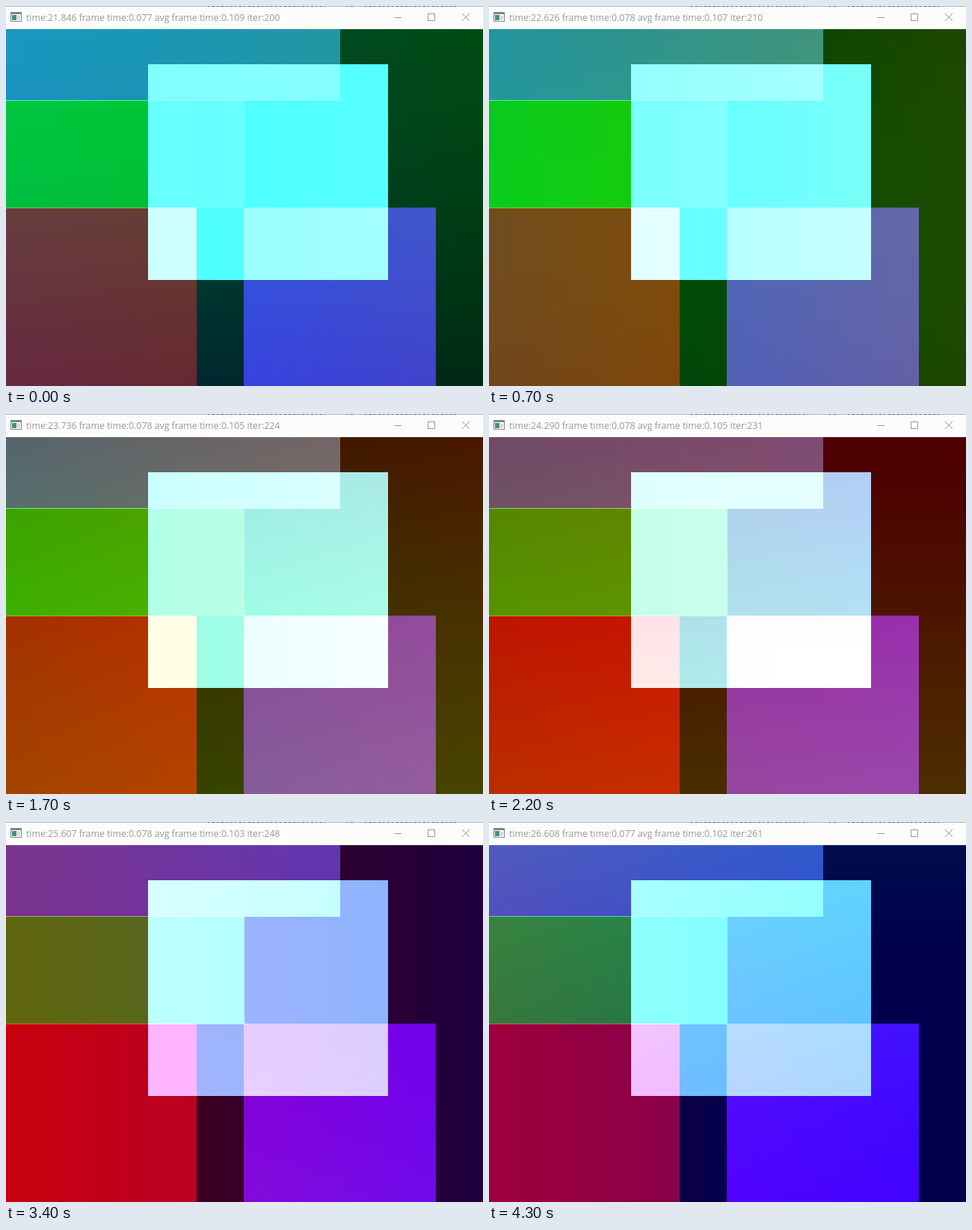
An HTML page with a canvas for the animation above (4400 ms loop, 638 px wide and 509 px high).

```html
<!DOCTYPE html>
<html lang="en">
<head>
<meta charset="utf-8">
<title>Additive rectangles</title>
<style>
  html, body { margin: 0; width: 100%; height: 100%; overflow: hidden; background: #fcfcfa; }
  .stage { position: relative; width: 638px; height: 509px; overflow: hidden; }
  svg { position: absolute; left: 0; top: 0; }
  canvas { position: absolute; left: 0; top: 31px; }
  text { font: 12.3px "Open Sans", "Noto Sans", sans-serif; fill: #999; }
</style>
</head>
<body>
<div class="stage">
  <svg width="638" height="31">
    <rect width="638" height="31" fill="#fcfcfa"/>
    <path d="M0 .5H638" stroke="#b4b4b4"/>
    <path d="M270 .5H427M455 .5H467M480 .5H604" stroke="#666" stroke-dasharray="2 4 3 3"/>
    <!-- window icon -->
    <g shape-rendering="crispEdges">
      <rect x="6" y="8" width="15" height="13" fill="#808488"/>
      <rect x="7" y="11" width="13" height="9" fill="#fff"/>
      <rect x="8" y="12" width="6" height="7" fill="#3f8f86"/>
      <path d="M15 13.5H19M15 15.5H19M15 17.5H19" stroke="#b0b0b0"/>
    </g>
    <text id="title" x="27" y="20"></text>
    <g fill="none" stroke="#999">
      <path d="M519 15.5H529"/>
      <rect x="564.5" y="10.5" width="9" height="9"/>
      <path d="M610 10L620 20M620 10L610 20"/>
    </g>
  </svg>
  <canvas id="view" width="638" height="478"></canvas>
</div>
<script>
const W = 638, H = 478, STEP = 100, STEPS = 44;
const title = document.getElementById('title');
const ctx = document.getElementById('view').getContext('2d');
const image = ctx.createImageData(W, H);
const light = new Float32Array(W * H * 3);

// Corners are fractions of a 640 x 480 field, measured from its top left.
function addRect(u0, v0, u1, v1, rgb) {
  const left = Math.max(0, Math.round(u0 * 640) - 2);
  const top = Math.max(0, Math.round(v0 * 480) - 1);
  const right = Math.min(W, Math.round(u1 * 640) - 1);
  const bottom = Math.min(H, Math.round(v1 * 480));
  for (let y = top; y < bottom; y++)
    for (let x = left; x < right; x++)
      rgb.forEach((v, c) => { light[(y * W + x) * 3 + c] += v * 255; });
}

addRect(0, 0, .7, .2, [.2, .3, .5]);
addRect(0, .2, .5, .5, [.1, .5, 0]);
addRect(0, .5, .4, 1, [.5, 0, 0]);
addRect(.5, .5, .9, 1, [.3, .1, .7]);
addRect(.3, .1, .8, .7, [.4, .8, 1]);

const wave = angle => 255 * (.1 + .2 * Math.cos(angle));

function paint(time) {
  const red = new Float32Array(W), blue = new Float32Array(W);
  for (let x = 0; x < W; x++) {
    const u = (x + 1) / 640;
    red[x] = wave(time + u);
    blue[x] = wave(time + u + 4);
  }
  const out = image.data;
  for (let y = 0, p = 0, q = 0; y < H; y++) {
    const green = wave(time + 1 - y / 480 + 2);
    for (let x = 0; x < W; x++) {
      out[p++] = red[x] + light[q++];
      out[p++] = green + light[q++];
      out[p++] = blue[x] + light[q++];
      out[p++] = 255;
    }
  }
  ctx.putImageData(image, 0, 0);
}

// A steady clock that loses a little time during the first 40 iterations.
function timeAfter(count) {
  const s = Math.min(1, count / 40);
  return 21.846 + .077 * count + .065 * s * s * (3 - 2 * s);
}

function show(step) {
  const count = Math.round(step * 1.42);
  const iter = 200 + count;
  const time = timeAfter(count);
  const delta = .077 + iter % 19 % 2 * .001;
  const average = time / (iter + 1);
  title.textContent = `time:${time.toFixed(3)} frame time:${delta.toFixed(3)} ` +
    `avg frame time:${average.toFixed(3)} iter:${iter}`;
  paint(time);
}

const start = performance.now();
let shown = -1;
function tick() {
  const step = Math.floor((performance.now() - start) / STEP) % STEPS;
  if (step !== shown) show(shown = step);
  requestAnimationFrame(tick);
}
tick();
</script>
</body>
</html>
```
